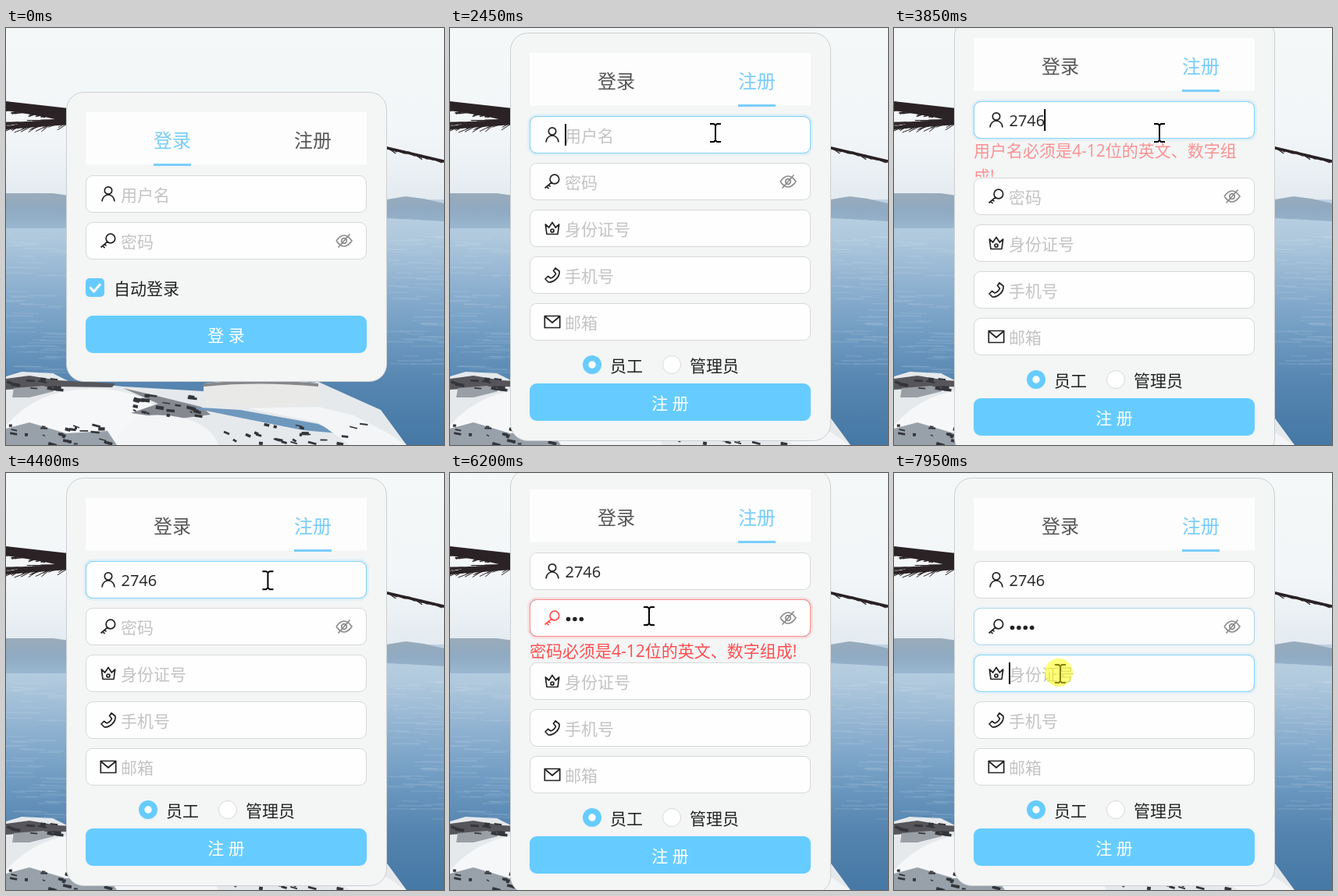
Write an HTML page that moves like this. It is 561 px wide and 535 px high and loops after 8 s.

```html
<!DOCTYPE html>
<html lang="zh">
<head>
<meta charset="utf-8">
<style>
html, body { margin: 0; width: 100%; height: 100%; overflow: hidden; }
svg { display: block; }
text { font: 350 21px "Open Sans", "Noto Sans CJK SC", "Noto Sans CJK", sans-serif; fill: #222; white-space: pre; }
.tab { font-size: 24px; }
.value { font-size: 20px; font-weight: 400; }
.hint { fill: #c3c3c3; }
.error { fill: #ff4d4f; font-weight: 400; }
.white { fill: #fff; }
.icon { fill: none; stroke-width: 1.7; stroke-linejoin: round; }
.cursor { stroke: #000; stroke-width: 1.4; fill: #fff; stroke-linejoin: round; }
</style>
</head>
<body>
<svg width="561" height="535" viewBox="0 0 561 535">
  <defs>
    <linearGradient id="sky" x2="0" y2="1">
      <stop stop-color="#f4f8f8"/><stop offset=".6" stop-color="#f3f6f8"/><stop offset="1" stop-color="#e2eaf0"/>
    </linearGradient>
    <linearGradient id="sea" x2="0" y2="1">
      <stop stop-color="#bdd2e3"/><stop offset=".15" stop-color="#b0c9dd"/><stop offset=".35" stop-color="#8eb1d0"/>
      <stop offset=".55" stop-color="#6f9bc2"/><stop offset=".75" stop-color="#5585b0"/><stop offset="1" stop-color="#4678a5"/>
    </linearGradient>
    <linearGradient id="hill" x2="0" y2="1">
      <stop stop-color="#9aabba"/><stop offset=".5" stop-color="#8faac2"/><stop offset="1" stop-color="#9ab7d0"/>
    </linearGradient>
  </defs>
  <rect width="561" height="225" fill="url(#sky)"/>
  <rect y="220" width="561" height="315" fill="url(#sea)"/>
  <path d="M0 212H60L130 222 420 228 488 220 512 216 535 219 561 225V248L488 244 300 240 80 257H0Z" fill="url(#hill)"/>
  <g id="ripples" stroke="#fff" stroke-opacity=".1"></g>
  <g id="palms" stroke="#2b2326" fill="none">
    <path d="M0 94L80 103V121L45 113 0 106ZM0 126L80 115V124L0 130Z" fill="#2b2326" stroke="none"/>
  </g>
  <path d="M0 447L20 441 60 443 80 453 150 460 253 466 400 454 480 490 513 535H0Z" fill="#e6e9ec"/>
  <path d="M0 450L30 446 66 452 140 456 136 461 60 460 0 464Z" fill="#55555a"/>
  <path d="M10 462L48 459 62 466 30 474 8 474Z" fill="#9a9fa5"/>
  <path d="M0 510Q40 463 110 463T205 500L190 535H0Z" fill="#f6f7f8"/>
  <path d="M150 462L185 470 250 486 262 496 215 502 160 494 195 482Z" fill="#85898f"/>
  <path d="M232 486L300 490 400 508 425 520 380 516 300 500Z" fill="#6f98bd"/>
  <path d="M140 535Q150 492 205 497T272 535Z" fill="#f4f5f6"/>
  <path d="M253 456Q325 447 400 456V483Q325 490 253 483Z" fill="#e9e9e8"/>
  <path d="M253 456Q325 449 400 456V460Q325 453 253 460Z" fill="#85878a"/>
  <path d="M0 514L30 506 77 520 130 517 142 535H0Z" fill="#98a1aa"/>
  <path d="M310 488L400 486 445 497 490 520 512 535H440L400 506Z" fill="#f3f5f6"/>
  <g id="clutter" stroke="#33353a"></g>
  <g id="card"></g>
</svg>
<script>
const LOOP = 8000, BLUE = '#6cf';
const $ = id => document.getElementById(id);
const clamp = x => Math.min(1, Math.max(0, x));
const ramp = (t, a, b) => clamp((t - a) / (b - a));
const smooth = x => x < .5 ? 2 * x * x : 1 - 2 * (1 - x) ** 2;
const within = (t, spans) => spans.some(([a, b]) => t >= a && t < b);
const fade = (t, on, off, d = 100) => ramp(t, on, on + d) - ramp(t, off, off + d);
const swell = (t, on, off) => smooth(ramp(t, on, on + 300)) - smooth(ramp(t, off, off + 300));
const typed = (t, times) => times.filter(at => t >= at).length;
const text = (x, y, s, cls = '', extra = '') => `<text x="${x}" y="${y}" class="${cls}" ${extra}>${s}</text>`;
const box = (x, y, w, h, r, attrs) => `<rect x="${x}" y="${y}" width="${w}" height="${h}" rx="${r}" ${attrs}/>`;

const icons = {
  user: 'M4.7-4.5A4.7 4.7 0 1 1-4.7-4.5 4.7 4.7 0 1 1 4.7-4.5M-8 9.5A8 8.5 0 0 1 8 9.5',
  key: 'M8.7-3A5.8 5.8 0 1 1-2.9-3 5.8 5.8 0 1 1 8.7-3M-1 1.2L-9.5 8.5M-7 6.5l2.5 2.8M-4.5 4.3l2 2.2',
  crown: 'M-8.7-5L-7 7.5H7L8.7-5 4.3-1 0-7.5-4.3-1ZM2 3A2 2 0 1 1-2 3 2 2 0 1 1 2 3',
  phone: 'M4-9L9-5C10 3 1 10-5 9L-9 5-5.5 1.5-2 4C1 3 3.5 1 4.5-2L1.5-5.5Z',
  mail: 'M-9.7-7.5H9.7V7.5H-9.7ZM-9.5-7L0 1 9.5-7',
  eye: 'M-10 0Q-5-7 0-7T10 0Q5 7 0 7T-10 0M3.3 0A3.3 3.3 0 1 1-3.3 0 3.3 3.3 0 1 1 3.3 0M-7.5 8.5L7.5-8.5'
};
const icon = (name, x, y, color = '#222') =>
  `<path class="icon" d="${icons[name]}" transform="translate(${x} ${y})" stroke="${color}"/>`;

const cursors = {
  arrow: 'M0 0V24L6 19 10 27 14 25 10 17H18Z',
  hand: 'M-2 20V2Q0-2 2 2V10Q5 7 7 11 10 9 11 13 14 11 15 15V22L12 31H0L-6 21Q-8 16-4 16ZM2 10V17M7 11V17M11 13V18',
  beam: 'M-7-11H-2L0-9 2-11H7M-7 12H-2L0 10 2 12H7M0-9V10'
};
const route = [
  [350, 526, 262], [800, 393, 146], [1000, 391, 139], [1200, 391, 139], [1350, 370, 158], [1550, 340, 134],
  [4350, 340, 134], [4600, 285, 172], [4750, 285, 172], [4950, 255, 183],
  [7150, 255, 183], [7650, 215, 254], [7700, 213, 257], [LOOP, 213, 257]
];
const clicks = [[850, 1030], [1530, 1700], [5120, 5300], [7900, LOOP]];
const caretOn = [[1600, 2000], [2450, 2800], [3250, 4150], [4550, 4950], [5170, 6200], [6600, 7350], [7900, LOOP]];

function field(y, name, hint, { value = '', hover = 0, focus = 0, error = 0, eye } = {}) {
  const ring = (color, width, opacity, grow = 0) => opacity <= 0 ? '' :
    box(102.5 - grow, y + .5 - grow, 359 + 2 * grow, 47 + 2 * grow, 8.5 + grow,
      `fill="none" stroke="${color}" stroke-width="${width}" stroke-opacity="${opacity}"`);
  return box(102.5, y + .5, 359, 47, 8.5, 'fill="#fefefe" stroke="#d6d8d9"') +
    ring('#86d5fb', 1, Math.max(hover, focus)) +
    ring(BLUE, 3, .16 * focus * (1 - error), 1.5) +
    ring('#ff9293', 1, error) + ring('#ff4d4f', 3, .14 * error, 1.5) +
    icon(name, 131, y + 24, error > .5 ? '#ff4d4f' : '#222') +
    (value || text(147, y + 33, hint, 'hint')) +
    (eye ? icon('eye', 433, y + 24, '#8c8c8c') : '');
}

function explain(y, lines, { open, extra, alpha }) {
  if (alpha <= 0) return '';
  const rows = lines.map((s, i) => text(0, 26 + 33 * i - 7.5 * (1 - alpha), s, 'error')).join('');
  return `<svg x="102" y="${y + 48}" width="360" height="${12 + extra - 3 * (1 - open)}" opacity="${alpha}">${rows}</svg>`;
}

// The text fades slightly ahead of the collapsing height.
function notice(t, on, off, height) {
  const open = swell(t, on, off);
  return { open, extra: Math.round(Math.max(0, height * open - 12)), alpha: swell(t, on, off - 30) };
}

const button = (y, label) => box(102, y, 360, 48, 9, `fill="${BLUE}"`) +
  text(282, y + 33, label, 'white', 'text-anchor="middle"');

function tabs(t) {
  const k = ramp(t, 1050, 1350) * 100;
  const tab = (x, s, on) => text(x, 71, s, 'tab', `text-anchor="middle" style="fill:color-mix(in srgb,#78ccf9 ${on}%,#555)"`);
  const bar = x => box(x - 24, 92, 48, 3, 0, 'fill="#7acefb"');
  return box(102, 26, 360, 67.5, 0, 'fill="#fdfdfd"') + tab(213, '登录', 100 - k) + tab(393, '注册', k) +
    (t < 1200 ? bar(213) : '') + (t >= 1050 ? bar(393) : '');
}

const loginForm = () =>
  field(107, 'user', '用户名') + field(167, 'key', '密码', { eye: true }) +
  box(102, 239, 24, 24, 5, `fill="${BLUE}"`) +
  '<path d="M107.5 250.5L112.5 256 121 246.500" fill="none" stroke="#fff" stroke-width="3"/>' +
  text(138, 260, '自动登录') + button(287, '登 录');

function registerForm(t, nameNote, secretNote) {
  const chars = typed(t, [3255, 3380, 3560, 3745]);
  const dots = typed(t, [5400, 5550, 5700, 6850]);
  const y2 = 167 + nameNote.extra, y3 = y2 + 60 + secretNote.extra;
  const name = chars ? text(147.5, 139, '2746'.slice(0, chars), 'value') : '';
  let secret = '';
  for (let i = 0; i < dots; i++) secret += `<circle cx="${151.5 + 8.4 * i}" cy="${y2 + 25.5}" r="2.8" fill="#222"/>`;

  const [cx, cy] = t < 5170 ? [147 + 11.3 * chars, 107] : t < 7900 ? [147 + 8.4 * dots, y2] : [147, y3];
  const caret = within(t, caretOn) ? box(cx, cy + 10, 2, 28, 0, 'fill="#000"') : '';

  return field(107, 'user', '用户名', {
      value: name, hover: fade(t, 1060, 4450), focus: fade(t, 1580, 5150), error: fade(t, 3260, 3745) }) +
    explain(107, ['用户名必须是4-12位的英文、数字组', '成!'], nameNote) +
    field(y2, 'key', '密码', {
      value: secret, eye: true, hover: fade(t, 4550, 7900), focus: fade(t, 5150, 7880), error: fade(t, 5410, 6860) }) +
    explain(y2, ['密码必须是4-12位的英文、数字组成!'], secretNote) +
    field(y3, 'crown', '身份证号', { hover: fade(t, 7500, LOOP), focus: fade(t, 7880, LOOP) }) +
    field(y3 + 60, 'phone', '手机号') + field(y3 + 120, 'mail', '邮箱') +
    `<circle cx="182" cy="${y3 + 199}" r="12" fill="${BLUE}"/><circle cx="182" cy="${y3 + 199}" r="4.7" fill="#fff"/>` +
    `<circle cx="284" cy="${y3 + 199}" r="11.5" fill="#fff" stroke="#d9d9d9"/>` +
    text(205, y3 + 208, '员工') + text(307, y3 + 208, '管理员') + button(y3 + 223, '注 册') + caret;
}

function pointer(t) {
  if (t < 350) return '';
  const i = route.findIndex(k => k[0] > t), [a, x0, y0] = route[i - 1], [b, x1, y1] = route[i];
  const k = smooth(ramp(t, a, b)), x = x0 + (x1 - x0) * k, y = y0 + (y1 - y0) * k;
  const kind = t < 650 ? 'arrow' : t < 1200 ? 'hand' : 'beam';
  const style = kind === 'beam' ? 'fill:none;stroke-width:2' : '';
  return `<path class="cursor" d="${cursors[kind]}" style="${style}" transform="translate(${x} ${y})"/>` +
    (within(t, clicks) ? `<circle cx="${x - 2}" cy="${y - 1}" r="18" fill="#ff0" fill-opacity=".52"/>` : '');
}

function render(t) {
  const nameNote = notice(t, 3295, 3745, 66), secretNote = notice(t, 5430, 6860, 33);
  const register = t >= 1050;
  const height = register ? 524 + nameNote.extra + secretNote.extra : 372;
  $('card').innerHTML = `<g transform="translate(0 ${Math.floor(268 - height / 2)})">` +
    box(77.5, .5, 410, height - 1, 22, 'fill="#f4f5f5" stroke="#ccd0d2"') + tabs(t) +
    (register ? registerForm(t, nameNote, secretNote) : loginForm()) + '</g>' + pointer(t);
}

function paintScenery() {
  let seed = 7;
  const rand = () => (seed = seed * 16807 % 2147483647) / 2147483647;
  const line = (x0, y0, x1, y1, w) => `<path d="M${x0} ${y0}L${x1} ${y1}" stroke-width="${w}"/>`;
  let waves = '', leaves = '', specks = '';
  for (let i = 0; i < 110; i++) {
    const x = rand() < .55 ? rand() * 70 - 10 : 485 + rand() * 70, y = 265 + rand() * 180;
    waves += line(x, y, x + 15 + rand() * 35, y + rand(), 1 + rand());
  }
  for (let i = 0; i < 46; i++) {
    const x = 4 + i * 2, len = 18 + rand() * 22;
    leaves += line(x, 100 + x * .1, x - len, 93 + x * .1 + rand() * 16, 1.6);
    leaves += line(x, 122 - x * .06, x - len, 122 - x * .06 + rand() * 16, 1);
  }
  leaves += line(480, 152, 561, 171, 3.5);
  for (let i = 0; i < 26; i++) {
    const x = 484 + i * 3, y = 153 + i * .7;
    leaves += line(x, y, x + 9 + rand() * 8, y + 2 + rand() * 5, 1.2);
  }
  const scatter = (n, x, y, w, h) => {
    while (n--) {
      const px = x + rand() * w, py = y + rand() * h;
      specks += line(px, py, px + 3 + rand() * 9, py + rand() * 3, 1.5 + rand() * 3);
    }
  };
  scatter(24, 0, 508, 130, 26);
  scatter(12, 0, 450, 70, 16);
  scatter(22, 160, 470, 85, 30);
  scatter(24, 270, 505, 190, 28);
  $('ripples').innerHTML = waves;
  $('palms').innerHTML += leaves;
  $('clutter').innerHTML = specks;
}

paintScenery();
const start = performance.now();
(function tick() {
  render((performance.now() - start) % LOOP);
  requestAnimationFrame(tick);
})();
</script>
</body>
</html>
```
